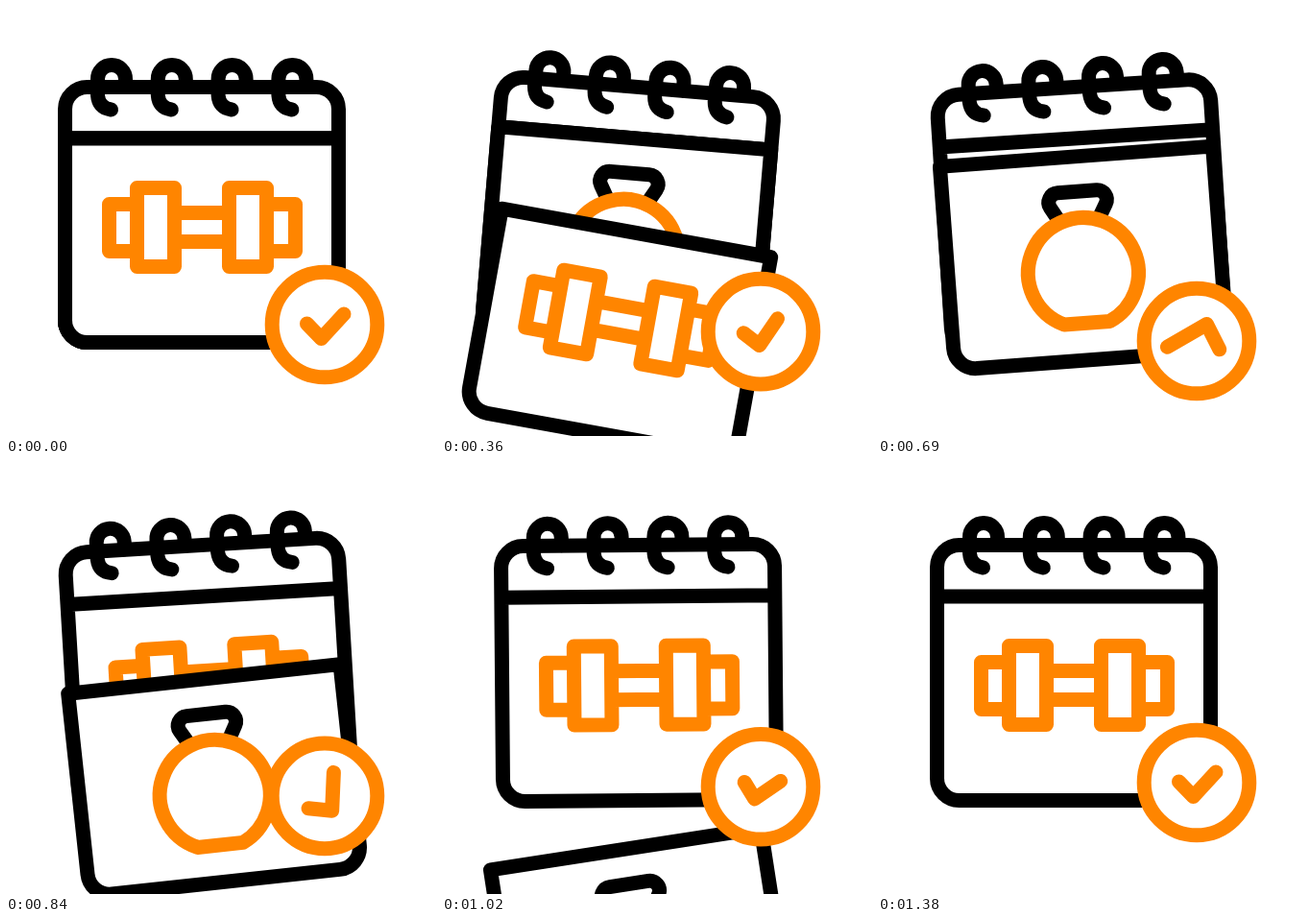
Write an HTML page with a canvas that moves like this. It is 448x448 px and loops after 1.47 s.

```html
<!DOCTYPE html>
<html lang="en">
<head>
<meta charset="utf-8">
<title>Workout calendar</title>
<style>
  html, body { margin: 0; width: 100%; height: 100%; overflow: hidden; background: #fff; }
  canvas { display: block; width: 100vw; height: 100vh; }
</style>
</head>
<body>
<canvas id="stage" width="448" height="448"></canvas>
<script>
const ctx = document.getElementById('stage').getContext('2d');
const BLACK = '#000', ORANGE = '#ff8500';
const LOOP = 1470, STEP = 30, LINE = 15, CORNER = 23;
const LEFT = 61.5, TOP = 84.5, WIDTH = 285, BOTTOM = 350.5, HEADER = 138;
const PIVOT = { x: 204, y: 100 };
const PAGE_CENTER = { x: 204, y: 244 };
const CLOCK_X = 332, CLOCK_Y = 332;

const clamp = v => Math.min(1, Math.max(0, v));
const progress = (t, from, to) => clamp((t - from) / (to - from));
const smooth = u => u * u * (3 - 2 * u);
const radians = deg => deg * Math.PI / 180;

function bezier(x1, y1, x2, y2) {
  const at = (a, b, s) => 3 * (1 - s) ** 2 * s * a + 3 * (1 - s) * s * s * b + s ** 3;
  return x => {
    if (x <= 0 || x >= 1) return clamp(x);
    let lo = 0, hi = 1;
    for (let i = 0; i < 30; i++) {
      const mid = (lo + hi) / 2;
      if (at(x1, x2, mid) < x) lo = mid; else hi = mid;
    }
    return at(y1, y2, lo);
  };
}

const spinEase = bezier(0.66, -0.37, 0.34, 1.37);
const sinkEase = bezier(0.75, 0, 0.4, 1);
const riseEase = bezier(0.4, 0, 0.25, 1);

// Calendar swings right, then left, then settles (degrees).
function tiltAt(t) {
  return 5.3 * smooth(progress(t, 0, 440))
       - 9.1 * smooth(progress(t, 485, 705))
       + 3.8 * smooth(progress(t, 780, 1090));
}

function paint(color, path, fill) {
  ctx.beginPath();
  path();
  if (fill) {
    ctx.fillStyle = fill;
    ctx.fill();
  }
  ctx.strokeStyle = color;
  ctx.stroke();
}

function rotateAbout({ x, y }, deg) {
  ctx.translate(x, y);
  ctx.rotate(radians(deg));
  ctx.translate(-x, -y);
}

function drawDumbbell() {
  paint(ORANGE, () => {
    ctx.rect(107.5, 206.5, 29, 49);
    ctx.rect(136.5, 189.5, 39, 82);
    ctx.rect(232.5, 189.5, 39, 82);
    ctx.rect(271.5, 206.5, 30, 49);
    for (const y of [215.5, 245.5]) {
      ctx.moveTo(175.5, y);
      ctx.lineTo(232.5, y);
    }
  });
}

function drawKettlebell() {
  paint(BLACK, () => {
    ctx.moveTo(183, 207);
    ctx.arcTo(164.5, 174.5, 202, 174.5, 10);
    ctx.arcTo(239.5, 174.5, 221, 207, 10);
    ctx.lineTo(221, 207);
  });
  paint(ORANGE, () => {
    ctx.arc(202.3, 259.5, 57.5, radians(114.5), radians(65.5));
    ctx.closePath();
  }, '#fff');
}

function drawCalendar() {
  paint(BLACK, () => {
    ctx.roundRect(LEFT, TOP, WIDTH, BOTTOM - TOP, CORNER);
    ctx.moveTo(LEFT, HEADER);
    ctx.lineTo(LEFT + WIDTH, HEADER);
  }, '#fff');
}

function drawRings() {
  for (const x of [110, 172.8, 235.6, 298.4]) {
    paint(BLACK, () => {
      ctx.moveTo(x + 14.5, 84);
      ctx.arc(x, 76, 14.5, 0, Math.PI, true);
      ctx.lineTo(x - 14.5, 93);
      ctx.quadraticCurveTo(x - 13.5, 106, x - 0.5, 108);
    });
  }
}

function drawPage(t, { start, drop, turn, turnPower, content }) {
  const u = Math.max(0, t - start) / 500;
  ctx.save();
  ctx.translate(0, drop * u ** 2.66);
  rotateAbout(PAGE_CENTER, turn * u ** turnPower);
  paint(BLACK, () => {
    ctx.roundRect(LEFT, HEADER, WIDTH, BOTTOM - HEADER, [0, 0, CORNER, CORNER]);
  }, '#fff');
  content();
  ctx.restore();
}

// Listed from the back of the stack to the front.
const pages = [
  { start: 495, drop: 230, turn: -7.3, turnPower: 2.66, content: drawKettlebell },
  { start: 12, drop: 256, turn: 12.4, turnPower: 2.3, content: drawDumbbell }
];

function drawClock(t) {
  const sink = 17 * (sinkEase(progress(t, 0, 680)) - riseEase(progress(t, 680, 1360)));
  const spin = spinEase(progress(t, 0, 1348));
  const size = 1 + 1.5 * spin * (1 - spin);
  const cos = size * Math.cos(spin * 2 * Math.PI);
  const sin = size * Math.sin(spin * 2 * Math.PI);

  ctx.save();
  ctx.translate(CLOCK_X, CLOCK_Y + sink);
  paint(ORANGE, () => ctx.arc(0, 0, 54.8, 0, 2 * Math.PI), '#fff');
  paint(ORANGE, () => {
    for (const [x, y] of [[-18.5, -1], [-3.5, 14.5], [20, -11]]) {
      ctx.lineTo(x * cos - y * sin, x * sin + y * cos);
    }
  });
  ctx.restore();
}

function draw(t) {
  ctx.fillStyle = '#fff';
  ctx.fillRect(0, 0, 448, 448);
  ctx.lineWidth = LINE;
  ctx.lineCap = ctx.lineJoin = 'round';

  ctx.save();
  rotateAbout(PIVOT, tiltAt(t));
  drawCalendar();
  drawDumbbell();
  for (const page of pages) drawPage(t, page);
  drawRings();
  ctx.restore();
  drawClock(t);
}

const began = performance.now();
function tick() {
  const t = (performance.now() - began) % LOOP;
  draw(Math.floor(t / STEP) * STEP);
  requestAnimationFrame(tick);
}
tick();
</script>
</body>
</html>
```
